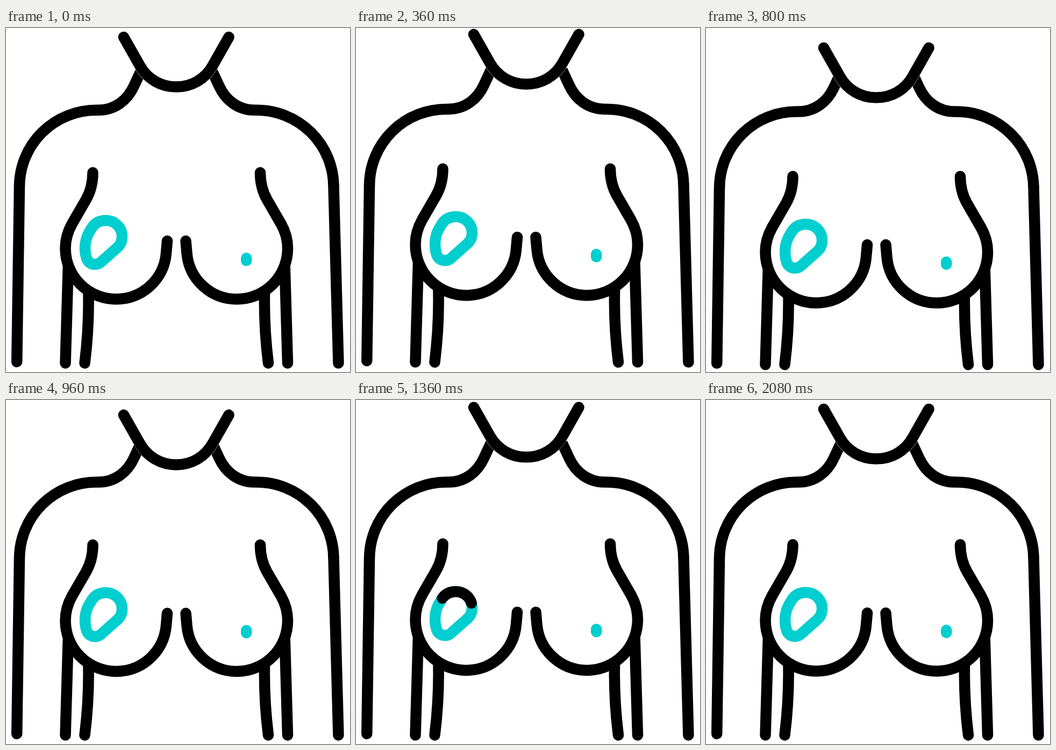
An HTML page for the animation above (2.24 s loop, 640 px wide and 640 px high).

```html
<!DOCTYPE html>
<html lang="en">
<head>
<meta charset="utf-8">
<title>Line icon</title>
<style>
  html, body { margin: 0; width: 100%; height: 100%; overflow: hidden; background: #fff; }
  svg { display: block; width: 100%; height: 100%; }
  path { fill: none; stroke: #000; stroke-width: 20.5; stroke-linecap: round; stroke-linejoin: round; }
  .solid { fill: #fff; }
  .halo { stroke: #fff; stroke-width: 21.2; stroke-linecap: butt; }
  .cyan { stroke: #00cecf; }
</style>
</head>
<body>
<svg viewBox="0 0 640 640">
  <defs>
    <g id="side">
      <path d="M116 436 L110.5 623.5"/>
      <path d="M153 476 C155 530 152.5 575 146.5 623.5"/>
    </g>
    <path id="shoulder" stroke-linecap="butt" style="stroke-linecap:butt"
      d="M251 80 L238 108 C226 134 203 152.8 172 152.8 L168 152.8 A143 142.5 0 0 0 25 294"/>
    <path id="breast" class="solid"
      d="M161.5 269 C161.5 287 157.5 304 149 319 L123 364 C114.5 379 110.5 394 110.5 410
         A94.5 94.5 0 0 0 205 504.5 C254 504.5 294 467 298 419 L300 396.3"/>
  </defs>
  <g id="body">
    <use href="#side"/>
    <use href="#shoulder"/>
    <path d="M25 293 L20.2 621"/>
    <g transform="matrix(-1 0 0 1 634.5 0)">
      <use href="#side"/>
      <use href="#shoulder"/>
      <path d="M25 293 L16 623.5"/>
    </g>
  </g>
  <g id="chest">
    <use href="#breast"/>
    <use href="#breast" transform="matrix(-1 0 0 1 634.5 0)"/>
    <path class="cyan" d="M447.2 428.2 V432.8"/>
    <path id="ring" class="cyan"
      d="M153.8 381.5 L159.8 371.5 C165.5 362.5 175 358 186 358 A30 30 0 0 1 216 388
         C216 396 212.5 404 206.5 409 L179.5 433 C175.5 437 171 439.8 166 439.8
         C157 439.8 151.5 434.5 149.5 427 C147 419 146.6 410 147.5 402 C148.5 394 150.3 388 153.8 381.5 Z"/>
    <path id="trace" pathLength="1"/>
  </g>
  <g id="neck">
    <path class="halo" d=""/>
    <path class="solid" d="M219 17 L249 70 C263 95 288 109.6 316.75 109.6 S370.5 95 384.5 70 L414.5 17"/>
  </g>
</svg>
<script>
  const LOOP = 2240, STEP = 40;
  const $ = id => document.getElementById(id);

  // vertical offsets: [time in ms, y]
  const moves = {
    neck: [[0, 0], [420, -5.5], [810, 20], [1180, -5.5], [1600, 0]],
    body: [[0, 0], [260, -3], [680, 4.8], [950, 0]],
    chest: [[0, 0], [220, -10], [760, 7.4], [1130, -5], [1500, 0]]
  };

  const ease = (t, from, to) => {
    const s = Math.min(1, Math.max(0, (t - from) / (to - from)));
    return s * s * (3 - 2 * s);
  };

  function offset(keys, t) {
    let y = keys[0][1];
    for (let i = 1; i < keys.length; i++)
      y += (keys[i][1] - keys[i - 1][1]) * ease(t, keys[i - 1][0], keys[i][0]);
    return y;
  }

  const trace = $('trace');
  trace.setAttribute('d', $('ring').getAttribute('d'));
  const [halo, line] = $('neck').children;
  halo.setAttribute('d', line.getAttribute('d'));

  function draw(t) {
    for (const id in moves)
      $(id).setAttribute('transform', `translate(0 ${offset(moves[id], t).toFixed(2)})`);
    const head = ease(t, 1020, 1880), tail = ease(t, 1240, 2080);
    trace.style.display = head > tail ? '' : 'none';
    trace.setAttribute('stroke-dasharray', `${head - tail} 2`);
    trace.setAttribute('stroke-dashoffset', -tail);
  }

  function tick() {
    const t = performance.now() % LOOP;
    draw(Math.floor(t / STEP) * STEP);
    requestAnimationFrame(tick);
  }
  tick();
</script>
</body>
</html>
```
